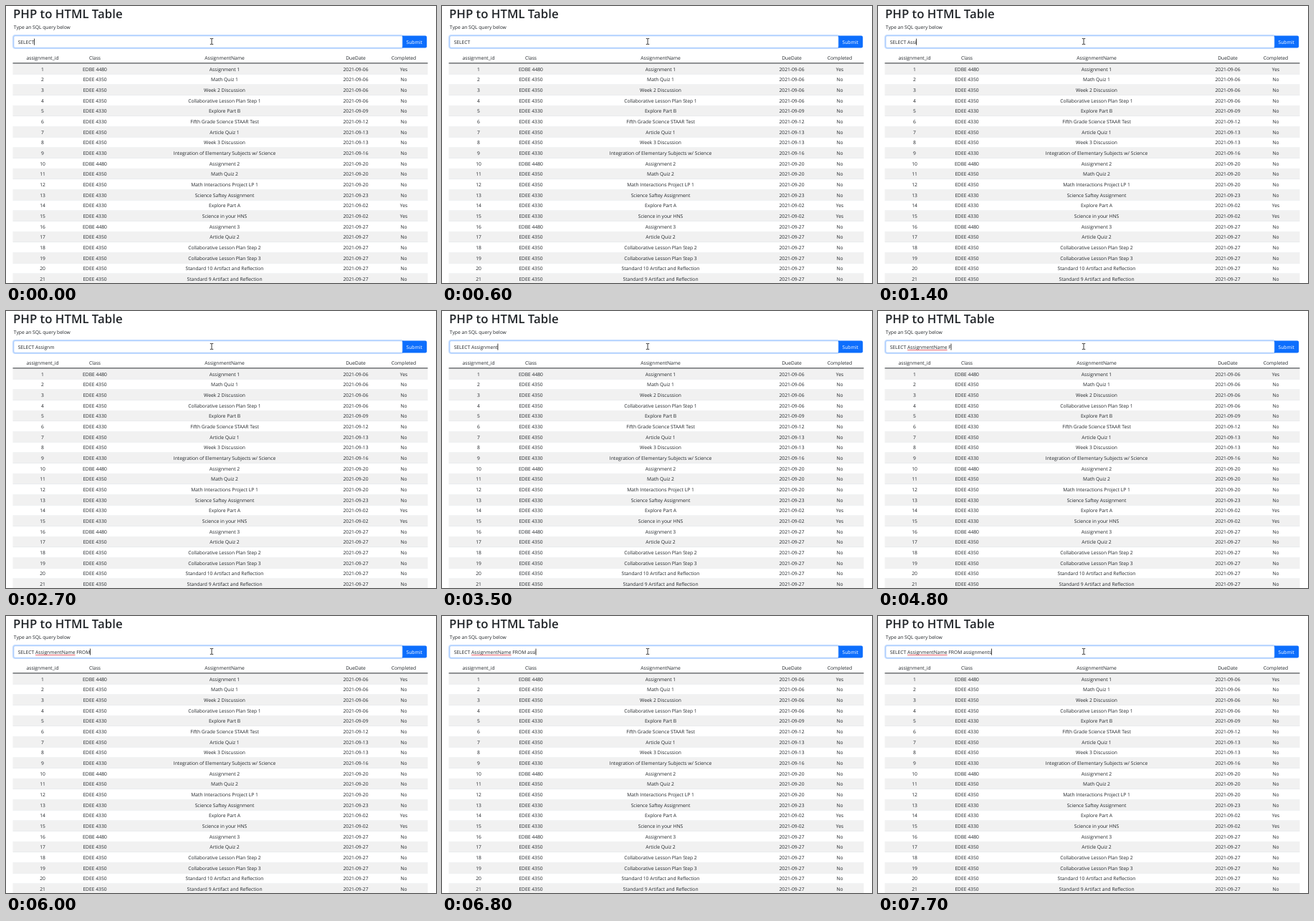
These frames come from a looping animation (600 px wide and 387 px high, 8000 ms). An HTML page:

```html
<!DOCTYPE html>
<html lang="en">
<head>
<meta charset="utf-8">
<title>PHP to HTML Table</title>
<style>
  html, body { margin: 0; width: 100%; height: 100%; overflow: hidden; background: #fff; }
  svg { display: block; width: 100vw; height: 100vh; }
  text {
    font-family: "Open Sans", "Noto Sans", sans-serif;
    font-size: 6.73px;
    fill: #212529;
    text-rendering: geometricPrecision;
  }
  .title { font-size: 16.8px; font-weight: 600; }
  .mid { text-anchor: middle; }
</style>
</head>
<body>
<svg id="stage" viewBox="0 0 600 387" xmlns="http://www.w3.org/2000/svg">
  <rect width="600" height="387" fill="#fff"/>
  <text class="title" x="10" y="17">PHP to HTML Table</text>
  <text x="10.8" y="32.2">Type an SQL query below</text>

  <rect x="10" y="41" width="544" height="18" rx="3" fill="none" stroke="#c2dbfe" stroke-width="1.9"/>
  <path d="M553 41.5H585a2.2 2.2 0 0 1 2.2 2.2V56.3a2.2 2.2 0 0 1 -2.2 2.2H553z" fill="#0d6efd"/>
  <rect x="10.9" y="41.8" width="542.2" height="16.5" rx="2" fill="#fff" stroke="#86b7fe" stroke-width=".6"/>
  <text class="mid" x="569.7" y="52.8" style="fill:#fff">Submit</text>
  <text id="query" x="16.7" y="52.8"></text>
  <rect id="squiggle" y="54" height=".8" fill="#e8434f"/>
  <rect id="caret" y="45.6" width=".8" height="9" fill="#111"/>
  <path d="M284.8 45.5h1.6l.6.5.6-.5h1.6M284.8 53.5h1.6l.6-.5.6.5h1.6M287 46v7" fill="none" stroke="#222" stroke-width=".9"/>
  <g id="table"></g>
</svg>
<script>
const NS = "http://www.w3.org/2000/svg";
const $ = id => document.getElementById(id);
const table = $("table");

function add(tag, attrs, content = "") {
  const node = document.createElementNS(NS, tag);
  for (const key in attrs) node.setAttribute(key, attrs[key]);
  node.textContent = content;
  table.appendChild(node);
}

const columns = [51, 124, 305, 488, 555];
const putRow = (cells, y) =>
  cells.forEach((cell, i) => add("text", { class: "mid", x: columns[i], y }, cell));

// class | assignment | month-day | completed
const rows = `EDBE 4480|Assignment 1|09-06|Yes
EDEE 4350|Math Quiz 1|09-06|No
EDEE 4350|Week 2 Discussion|09-06|No
EDEE 4350|Collaborative Lesson Plan Step 1|09-06|No
EDEE 4330|Explore Part B|09-09|No
EDEE 4330|Fifth Grade Science STAAR Test|09-12|No
EDEE 4350|Article Quiz 1|09-13|No
EDEE 4350|Week 3 Discussion|09-13|No
EDEE 4330|Integration of Elementary Subjects w/ Science|09-16|No
EDBE 4480|Assignment 2|09-20|No
EDEE 4350|Math Quiz 2|09-20|No
EDEE 4350|Math Interactions Project LP 1|09-20|No
EDEE 4330|Science Saftey Assignment|09-23|No
EDEE 4330|Explore Part A|09-02|Yes
EDEE 4330|Science in your HNS|09-02|Yes
EDBE 4480|Assignment 3|09-27|No
EDEE 4350|Article Quiz 2|09-27|No
EDEE 4350|Collaborative Lesson Plan Step 2|09-27|No
EDEE 4350|Collaborative Lesson Plan Step 3|09-27|No
EDEE 4350|Standard 10 Artifact and Reflection|09-27|No
EDEE 4350|Standard 9 Artifact and Reflection|09-27|No`.split("\n");

const left = 9.5, width = 579, top0 = 80.7, pitch = 14.67;
putRow(["assignment_id", "Class", "AssignmentName", "DueDate", "Completed"], 75.3);
rows.forEach((row, i) => {
  const y = top0 + i * pitch;
  const [course, name, day, done] = row.split("|");
  if (i % 2 === 0) add("rect", { x: left, y, width, height: pitch, fill: "#f1f1f1" });
  add("rect", { x: left, y: y + pitch - .45, width, height: .45, fill: "#dee2e6" });
  putRow([i + 1, course, name, "2021-" + day, done], y + 9.8);
});
add("rect", { x: left, y: 79.4, width, height: 1, fill: "#212529" });

const LOOP = 8000;
const phrase = "SELECT AssignmentName FROM assignments".replace(/ /g, "\u00a0");
// [time, characters typed]; a negative count hides the caret
const steps = [
  [0, 6], [100, 7], [600, -7], [1000, 8], [1200, 9], [1400, 11],
  [1900, 12], [2000, 13], [2300, 14], [2700, -14], [3200, 14],
  [3300, 15], [3400, 16], [3500, 17], [3900, 18], [4000, 19],
  [4100, 20], [4200, 21], [4400, 22], [4800, 23], [6000, 26],
  [6100, 27], [6300, 28], [6500, 29], [6600, 30], [6800, 31],
  [7000, 32], [7100, 33], [7200, 34], [7400, 36], [7600, 37], [7700, 38]
];

const query = $("query"), caret = $("caret"), squiggle = $("squiggle");
const startX = 16.7;

query.textContent = phrase;
const widthOf = count => query.getSubStringLength(0, count);
const wordStart = widthOf(7), wordEnd = widthOf(21);
squiggle.setAttribute("x", startX + wordStart);
squiggle.setAttribute("width", wordEnd - wordStart);

function draw(time) {
  const t = time % LOOP;
  const count = steps.filter(step => step[0] <= t).pop()[1];
  const typed = Math.abs(count);
  query.textContent = phrase.slice(0, typed);
  caret.setAttribute("x", startX + widthOf(typed) - .2);
  caret.setAttribute("visibility", count > 0 ? "visible" : "hidden");
  squiggle.setAttribute("visibility", t >= 4500 ? "visible" : "hidden");
}

const began = performance.now();
function tick() {
  draw(performance.now() - began);
  requestAnimationFrame(tick);
}
tick();
</script>
</body>
</html>
```
